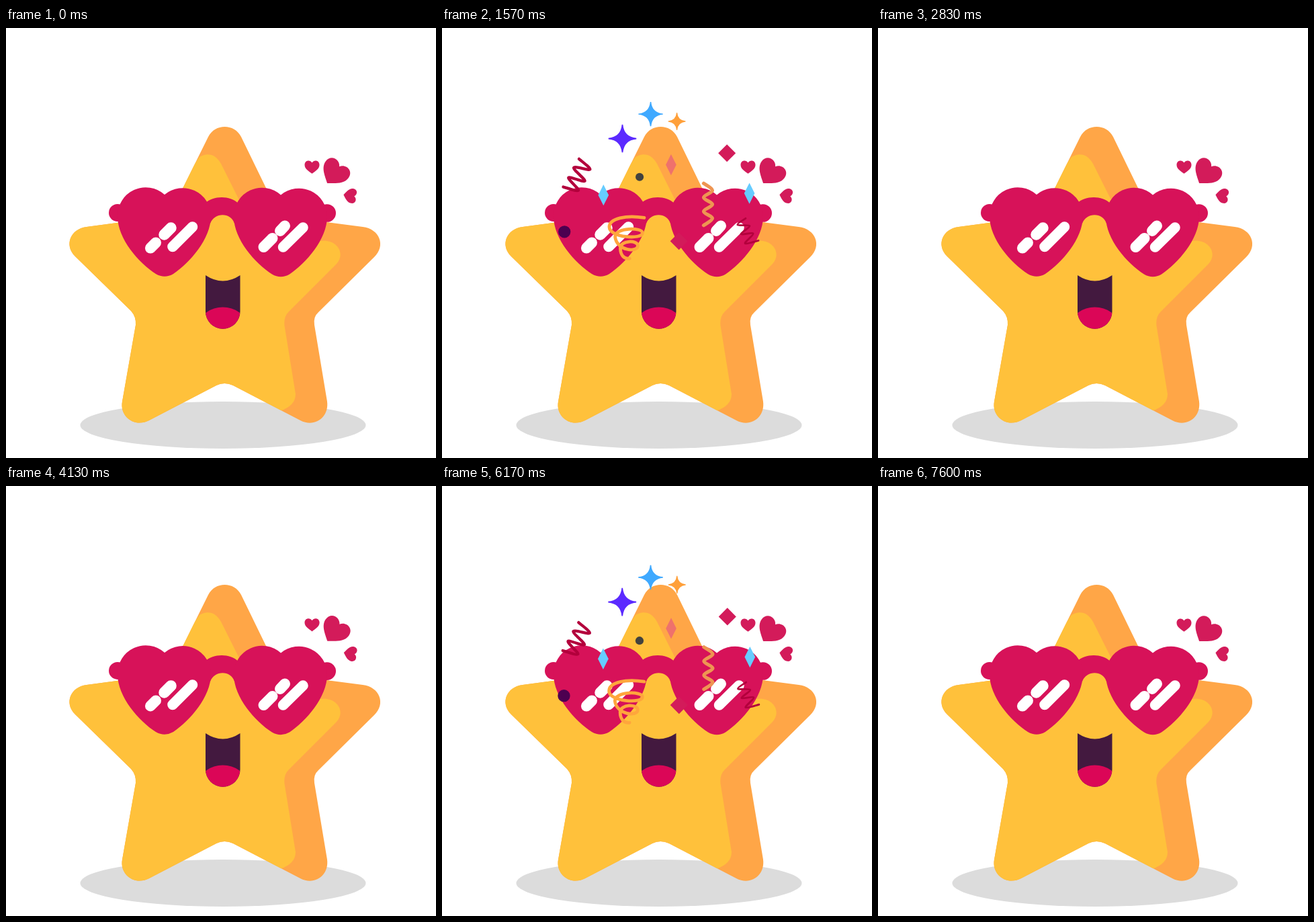
Write an HTML page with a canvas that moves like this. It is 640 by 640 pixels and loops after 8410 ms.

```html
<!DOCTYPE html>
<html lang="en">
<head>
<meta charset="utf-8">
<title>Party star</title>
<style>
html, body { margin: 0; width: 100%; height: 100%; overflow: hidden; background: #fff; }
canvas { display: block; width: 640px; height: 640px; }
</style>
</head>
<body>
<canvas id="stage" width="640" height="640"></canvas>
<script>
const ctx = document.getElementById('stage').getContext('2d');
const LOOP = 8410;
const PINK = '#d71259', ROSE = '#d31b5a', WINE = '#b3003c', SKY = '#66ccff';

const star = new Path2D(`M301 162 C311 142 340 142 350 162 L404 273 Q408 280 416 281
  L531 296 C556 299 566 324 548 341 L465 423 Q457 430 459 442 L478 556
  C481 580 459 595 438 584 L338 532 Q325 526 313 532 L213 584
  C192 595 169 579 173 556 L193 442 Q194 430 186 421 L103 340
  C86 323 96 299 120 296 L232 281 Q242 280 246 273 Z`);
const light = new Path2D(`M288 192 C299 185 312 187 320 202 L350 262 L400 310 L470 317
  C492 314 507 336 491 352 L421 422 Q413 430 414.5 443 L431 545 Q431 562 408 570
  L300 640 L0 640 L0 260 L240 260 Z`);
const lens = new Path2D(`M236 248 A42 42 0 0 0 166 280 C166 314 198 350 223 366
  Q236 373.5 249 366 C273 350 305 314 305 280 A42 42 0 0 0 236 248Z`);
const bridge = new Path2D(`M296 261 C309 249 333 249 346 261 L340 291
  C335 274 310 274 304 291 Z`);
const mouth = new Path2D(`M297 368 Q322.7 385 348.5 368 V422
  A25.75 25.75 0 0 1 297 422 Z`);
const heartShape = new Path2D(`M0 .44 C-.2 .29 -.5 .13 -.5 -.15 C-.5 -.47 -.13 -.51 0 -.29
  C.13 -.51 .5 -.47 .5 -.15 C.5 .13 .2 .29 0 .44Z`);
const swirl = new Path2D(`M-19 63 C-50 58 -79 64 -79 79 C-79 97 -22 101 -22 89
  C-22 79 -69 79 -69 96 C-66 120 -30 123 -30 111 C-30 101 -60 101 -60 115
  C-60 127 -54 134 -44 133`);

function spline(pts) {
  const p = new Path2D();
  p.moveTo(...pts[0]);
  for (let i = 0; i < pts.length - 1; i++) {
    const a = pts[i - 1] || pts[i], b = pts[i], c = pts[i + 1], d = pts[i + 2] || c;
    p.bezierCurveTo(b[0] + (c[0] - a[0]) / 6, b[1] + (c[1] - a[1]) / 6,
      c[0] - (d[0] - b[0]) / 6, c[1] - (d[1] - b[1]) / 6, c[0], c[1]);
  }
  return p;
}
const zigLeft = spline([[-158, 10], [-132, 16], [-149, -6], [-121, 0], [-140, -23], [-112, -20], [-131, -38]]);
const zigRight = spline([[155, 64], [141, 75], [162, 77], [147, 91], [168, 90], [154, 107], [177, 102]]);
const wave = spline(Array.from({ length: 7 }, (_, i) => [i % 2 ? 98 : 83, 4 + 12 * i]));

// Confetti path: progress, centre y, scale, opacity
const FLIGHT = [
  [-450, 10, .05, 0], [0, 80, .455, .55], [362, 162, .79, 1], [632, 227.6, .867, 1],
  [832, 277, .895, 1], [1246, 384, .952, 1], [1392, 425, 1, 1], [1702, 511, 1.07, 1],
  [1900, 569, 1.115, 1]
];

function fill(path, color) {
  ctx.fillStyle = color;
  ctx.fill(path);
}
function stroke(path, color, width) {
  ctx.strokeStyle = color;
  ctx.lineWidth = width;
  ctx.stroke(path);
}
function line(x1, y1, x2, y2, width) {
  const p = new Path2D();
  p.moveTo(x1, y1);
  p.lineTo(x2, y2);
  stroke(p, '#fff', width);
}
function ellipse(x, y, rx, ry, color) {
  const p = new Path2D();
  p.ellipse(x, y, rx, ry, 0, 0, Math.PI * 2);
  fill(p, color);
}
function diamond(x, y, rx, ry, color) {
  fill(new Path2D(`M${x} ${y - ry} L${x + rx} ${y} L${x} ${y + ry} L${x - rx} ${y}Z`), color);
}
function sparkle(x, y, r, color) {
  ctx.save();
  ctx.translate(x, y);
  ctx.scale(r, r);
  fill(new Path2D(`M-.04 -1 H.04 Q.12 -.12 1 -.04 V.04 Q.12 .12 .04 1
    H-.04 Q-.12 .12 -1 .04 V-.04 Q-.12 -.12 -.04 -1Z`), color);
  ctx.restore();
}
function heart(x, y, w, deg) {
  ctx.save();
  ctx.translate(x, y);
  ctx.rotate(deg * Math.PI / 180);
  ctx.scale(w, w);
  fill(heartShape, ROSE);
  ctx.restore();
}

// Smooth rise and fall between two times
function bump(t, from, to) {
  return t > from && t < to ? Math.sin(Math.PI * (t - from) / (to - from)) ** 2 : 0;
}

function drawStar() {
  ellipse(323, 591, 212.5, 35, '#dcdcdc');
  fill(star, '#ffa647');
  ctx.save();
  ctx.clip(star);
  fill(light, '#ffc13b');
  ctx.restore();
  fill(mouth, '#43193f');
  ctx.save();
  ctx.clip(mouth);
  ellipse(322.7, 441, 34, 25.5, '#db0657');
  ctx.restore();
}

function drawGlasses(t) {
  const deg = 2.6 * bump(t, 0, 800) - 4 * bump(t, 800, 1300);
  ctx.save();
  ctx.translate(322, 320);
  ctx.rotate(deg * Math.PI / 180);
  ctx.translate(-322, -320);
  ellipse(166, 275, 13, 13, PINK);
  ellipse(477.7, 275.5, 13.3, 13.3, PINK);
  fill(bridge, PINK);
  fill(lens, PINK);
  ctx.save();
  ctx.translate(173, 0.5);
  fill(lens, PINK);
  ctx.restore();
  line(215, 327.5, 223, 319.5, 16);
  line(235.5, 307.5, 245.5, 297.5, 16.5);
  line(248, 325.5, 277.5, 296, 15.5);
  line(383.5, 326, 396.5, 313, 16);
  line(408, 302, 415, 294.5, 16);
  line(412.5, 326, 442, 297, 15.5);
  ctx.restore();
}

function drawHearts(t) {
  const k = 1 + .45 * bump(t, 0, 800) + .3 * bump(t, 800, 1300);
  ctx.save();
  ctx.translate(450, 255);
  ctx.scale(k, k);
  ctx.translate(-450, -255);
  heart(455.5, 207, 22, 0);
  heart(489, 216, 42, 36);
  heart(512, 249.5, 22, 98);
  ctx.restore();
}

function drawConfetti(u) {
  const i = FLIGHT.findIndex(row => row[0] > u);
  if (i < 1) return;
  const a = FLIGHT[i - 1], b = FLIGHT[i];
  const f = (u - a[0]) / (b[0] - a[0]);
  const [, y, scale, alpha] = a.map((v, n) => v + (b[n] - v) * f);
  ctx.save();
  ctx.translate(317.5, y);
  ctx.scale(scale, scale);
  ctx.globalAlpha = alpha;
  stroke(swirl, '#ffa63c', 5.5);
  stroke(wave, '#ee9552', 6);
  stroke(zigLeft, WINE, 5);
  stroke(zigRight, WINE, 3.3);
  diamond(-89, 24, 9, 18, SKY);
  diamond(161.5, 21, 9, 18, SKY);
  diamond(27, -28, 9, 18, '#ef716c');
  diamond(123, -48, 15, 15, ROSE);
  diamond(40.5, 103, 15, 15, ROSE);
  ellipse(-27, -7, 7, 7, '#42423e');
  ellipse(-156, 87, 10.5, 10.5, '#4d0050');
  sparkle(-8, -115, 21, '#3fa9ff');
  sparkle(-56.5, -73, 24, '#5b2aff');
  sparkle(37, -102.5, 15, '#ffa03a');
  ctx.restore();
}

function draw(t) {
  ctx.fillStyle = '#fff';
  ctx.fillRect(0, 0, 640, 640);
  ctx.lineCap = ctx.lineJoin = 'round';
  const second = t >= 4100;
  const local = second ? t - 4100 : t;
  drawStar();
  drawHearts(local);
  drawGlasses(local);
  if (second) {
    const x = t - 5430;
    if (t < 7600) drawConfetti(x * (.912 - 1.56e-5 * x));
  } else if (t < 2830) {
    drawConfetti(t - 938);
  }
}

const start = performance.now();
function tick() {
  draw((performance.now() - start) % LOOP);
  requestAnimationFrame(tick);
}
tick();
</script>
</body>
</html>
```
